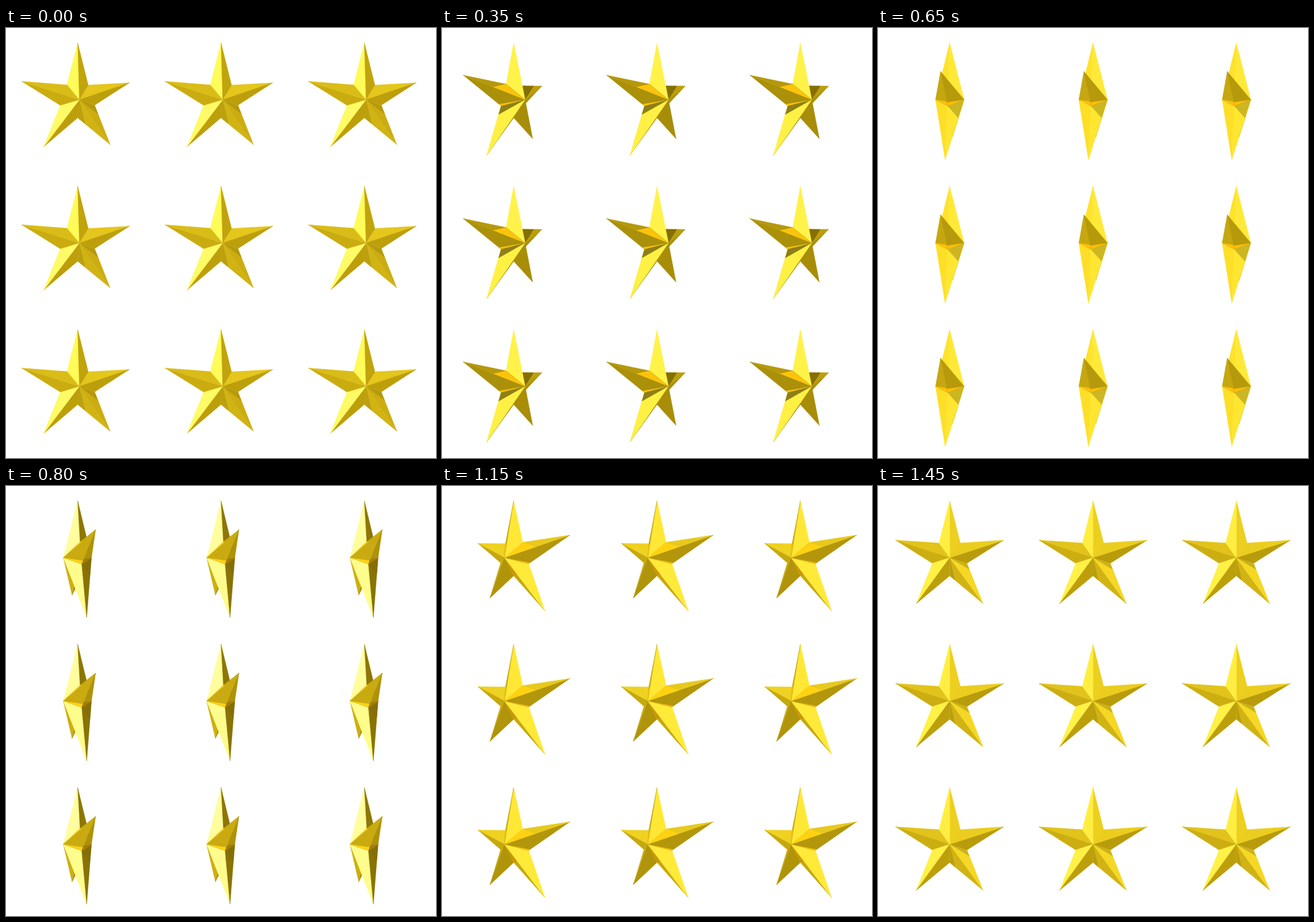
An HTML page with a canvas that plays this animation: 748 by 748 pixels, repeating every 1.5 s.

```html
<!DOCTYPE html>
<html lang="en">
<head>
<meta charset="utf-8">
<title>Turning gold stars</title>
<style>
html, body { margin: 0; width: 100%; height: 100%; overflow: hidden; background: #fff; }
canvas { display: block; }
</style>
</head>
<body>
<canvas id="stage" width="748" height="748"></canvas>
<script>
const ctx = document.getElementById('stage').getContext('2d');
const TILE = 748 / 3, CENTRE = 124.7;
const OUTER = 98.9, INNER = 31.6, DEPTH = 25, EYE = 247;
const STEP = 50, STEPS = 30;
const RAD = Math.PI / 180;
const FACE_TURN = 75.8;            // in-plane angle between a tip and its face normal
const FLAT = 0.717, FRONT = 0.697; // in-plane and forward parts of a face normal

const mix = (a, b, t) => a + (b - a) * t;
const clamp = (v, low, high) => Math.min(high, Math.max(low, v));
const dot = (a, b) => a[0] * b[0] + a[1] * b[1] + a[2] * b[2];
const polar = (radius, deg, z = 0) => [radius * Math.sin(deg * RAD), radius * Math.cos(deg * RAD), z];
const direction = (azimuth, elevation) => {
  const flat = Math.cos(elevation * RAD);
  return [flat * Math.sin(azimuth * RAD), Math.sin(elevation * RAD), flat * Math.cos(azimuth * RAD)];
};

// Gold from deep shade to highlight
const GOLD = [[88, 73, 0], [190, 160, 12], [255, 225, 40], [255, 251, 90], [255, 255, 245]];
const AMBIENT = 1.1;
const SUN = direction(-40, 45);

// Soft spots of light and shade on the sphere of normals
const lobe = (azimuth, elevation, width, gain) => {
  const axis = direction(azimuth, elevation);
  return normal => {
    const angle = Math.acos(clamp(dot(normal, axis), -1, 1)) / RAD;
    return gain * Math.exp(-((angle / width) ** 2));
  };
};
const lobes = [
  lobe(-20, 12, 29, 2.85), // key highlight
  lobe(35, 12, 15, 1.6),   // fill on the right
  lobe(82, 6, 35, -1.3),   // dark side
  lobe(5, -37, 16, -.5)    // dark floor
];

function tone(normal) {
  const level = clamp(lobes.reduce((sum, f) => sum + f(normal), AMBIENT), 0, 4);
  const i = Math.min(3, Math.floor(level));
  return GOLD[i].map((c, j) => mix(c, GOLD[i + 1][j], level - i));
}

// Tone of a neighbouring face mirrored in polished gold
const mirrored = (own, other) =>
  own.map((c, j) => Math.min(255, c * .4 + other[j] * [.7, .56, .1][j]));

const shaded = (own, strength) => own.map((c, j) => mix(c, GOLD[0][j], strength));

function buildFaces(angle) {
  const sin = Math.sin(angle), cos = Math.cos(angle);
  const turn = ([x, y, z]) => [x * cos + z * sin, y, z * cos - x * sin];
  const project = ([x, y, z]) => {
    const scale = EYE / Math.max(1, EYE - z);
    return [CENTRE + x * scale, CENTRE - y * scale];
  };
  const normalOf = (deg, side, front) =>
    turn(polar(FLAT, deg + FACE_TURN * side, FRONT * front));

  const faces = [];
  for (let deg = 0; deg < 360; deg += 72) {
    for (const side of [-1, 1]) for (const front of [-1, 1]) {
      const normal = normalOf(deg, side, front);
      const apex = turn([0, 0, DEPTH * front]);
      if (dot(normal, [-apex[0], -apex[1], EYE - apex[2]]) <= 0) continue;

      const tip = turn(polar(OUTER, deg));
      const inner = turn(polar(INNER, deg + 36 * side));
      const nextTip = turn(polar(OUTER, deg + 72 * side));
      const nextNormal = normalOf(deg + 72 * side, -side, front);
      const gap = dot(normal, nextTip) - dot(normal, apex);
      const color = tone(normal);
      const triangle = (corner, fill) => ({ points: [apex, inner, corner].map(project), fill: `rgb(${fill})` });
      const overlays = [];

      // Shadow thrown across the valley by the neighbouring arm
      const sun = dot(normal, SUN);
      if (sun > .05 && dot(nextNormal, SUN) < 0) {
        const shadowTip = nextTip.map((v, j) => v - SUN[j] * gap / sun);
        overlays.push(triangle(shadowTip, shaded(color, Math.min(.8, sun))));
      }
      const image = nextTip.map((v, j) => v - 2 * gap * normal[j]);
      overlays.push(triangle(image, mirrored(color, tone(nextNormal))));

      faces.push({ depth: tip[2], face: triangle(tip, color), overlays });
    }
  }
  return faces.sort((a, b) => a.depth - b.depth);
}

function paint({ points, fill }) {
  ctx.beginPath();
  points.forEach(([x, y]) => ctx.lineTo(x, y));
  ctx.closePath();
  ctx.fillStyle = ctx.strokeStyle = fill;
  ctx.fill();
}

function drawFace({ face, overlays }) {
  paint(face);
  ctx.stroke();
  ctx.save();
  ctx.clip();
  overlays.forEach(paint);
  ctx.restore();
}

function draw(now) {
  const step = Math.floor(now / STEP) % STEPS;
  const faces = buildFaces((step + 1) / STEPS * Math.PI);
  ctx.fillStyle = '#fff';
  ctx.fillRect(0, 0, 748, 748);
  ctx.lineWidth = .5;
  ctx.lineJoin = 'round';
  for (let i = 0; i < 9; i++) {
    ctx.save();
    ctx.translate(i % 3 * TILE, Math.floor(i / 3) * TILE);
    faces.forEach(drawFace);
    ctx.restore();
  }
}

let start;
function tick(now) {
  start ??= now;
  draw(now - start);
  requestAnimationFrame(tick);
}
draw(0);
requestAnimationFrame(tick);
</script>
</body>
</html>
```
